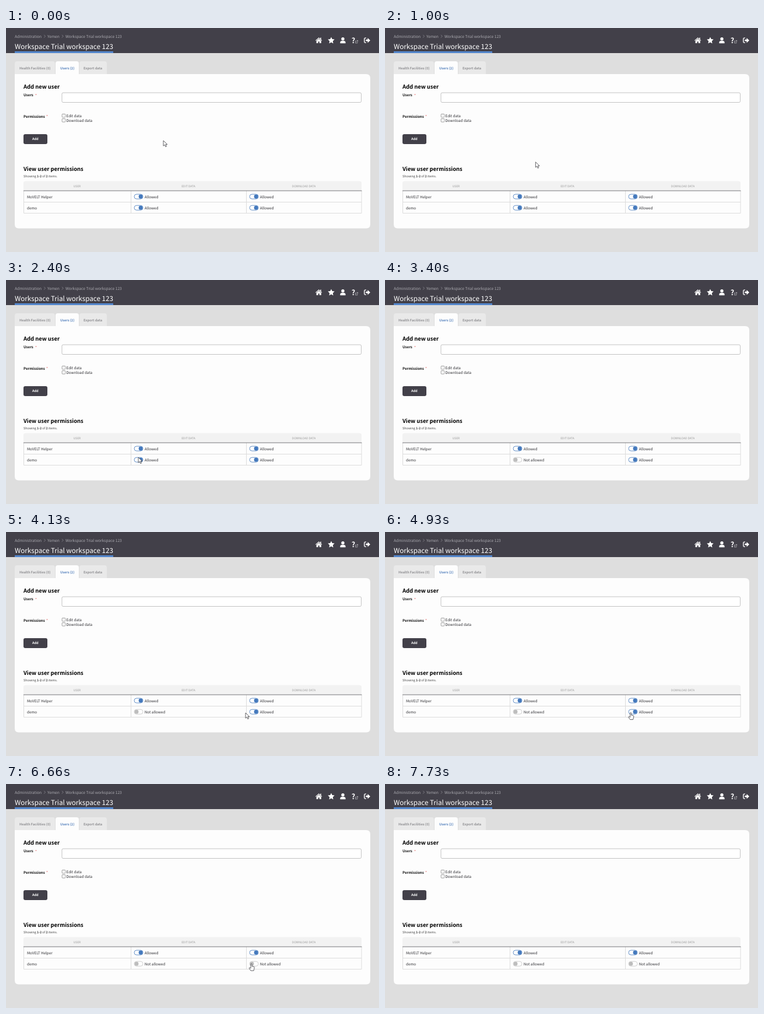
Recreate the animation shown at these times as an HTML page. Size 640 by 384 pixels, loop 8000 ms.

```html
<!DOCTYPE html>
<html lang="en">
<head>
<meta charset="utf-8">
<title>User permissions</title>
<style>
  html, body { margin: 0; width: 100%; height: 100%; overflow: hidden; background: #dedede; }
  svg { display: block; width: 640px; height: 384px; }
  text {
    font-family: "Noto Sans CJK JP", "Noto Sans CJK SC", "Noto Sans", sans-serif;
    font-size: 6.3px; fill: #2c2c30; text-rendering: geometricPrecision;
  }
  .crumb text { font-size: 6.68px; fill: #aaa9af; }
  .title { font-size: 11.65px; font-weight: 500; fill: #fff; }
  .tabs text { font-size: 5.65px; font-weight: 600; fill: #909093; }
  .tabs .active { fill: #5480bd; }
  h2, .heading { font-size: 9.38px; font-weight: 700; fill: #000; }
  .label { font-size: 6.15px; font-weight: 700; fill: #111; }
  .star { fill: #e05a5a; }
  .button { font-size: 5.6px; font-weight: 600; fill: #fff; }
  .summary { font-size: 5.35px; font-weight: 300; fill: #444; }
  .summary tspan { font-weight: 700; }
  .columns text { font-size: 4.95px; fill: #999; text-anchor: middle; }
  .toggle rect { fill: #fff; stroke: #4479bd; stroke-width: .8; }
  .toggle circle { fill: #4479bd; }
  .toggle.off rect { stroke: #c4c4c4; }
  .toggle.off circle { fill: #bdbdbd; }
  .cursor { fill: #fff; stroke: #3a3a3f; stroke-width: .8; stroke-linejoin: round; }
</style>
</head>
<body>
<svg viewBox="0 0 640 384">
  <rect width="640" height="384" fill="#dedede"/>
  <rect width="640" height="43" fill="#424049"/>

  <g class="crumb">
    <text x="15" y="16.6">Administration</text>
    <text x="71" y="16.6">Yemen</text>
    <text x="102" y="16.6">Workspace Trial workspace 123</text>
    <path d="M65.3 11.8l2.2 2.4-2.2 2.4M96 11.8l2.2 2.4-2.2 2.4" fill="none" stroke="#8b8a91" stroke-width=".8"/>
  </g>
  <text class="title" x="15" y="35.7">Workspace Trial workspace 123</text>
  <rect x="15" y="40" width="169" height="2.8" fill="#548bd6"/>

  <g fill="#fff">
    <path d="M531 21.3L536.7 16.3 542.3 21.3 541.6 22 536.7 17.8 531.7 22ZM532.6 22L536.7 18.6 540.8 22V26H537.8V23.2H535.6V26H532.6ZM539.3 16.6h1.4v2.8h-1.4Z"/>
    <path d="M558 15.5L559.7 19.1 563.7 19.6 560.8 22.4 561.5 26.4 558 24.5 554.5 26.4 555.2 22.4 552.3 19.6 556.3 19.1Z"/>
    <circle cx="578" cy="18.7" r="2.7"/>
    <path d="M573.4 26.3V24.8a2.9 2.9 0 0 1 2.9-2.9h3.4a2.9 2.9 0 0 1 2.9 2.9v1.5Z"/>
    <text x="592.7" y="26" style="font-size:12.5px;font-weight:700;fill:#fff">?</text>
    <path d="M601 22.2h-1.6v3.6h3.6v-1.6M601.2 24l2.3-2.4M601.8 21.4h1.9v1.9" fill="none" stroke="#d5d5d8" stroke-width=".6"/>
    <path d="M618 17.1h-1.8q-1.3 0-1.3 1.3v5.4q0 1.3 1.3 1.3h1.8" fill="none" stroke="#fff" stroke-width="1.4"/>
    <path d="M617.4 19.8H620.5V17L625 21.2 620.5 25.4V22.6H617.4Z"/>
  </g>

  <g class="tabs">
    <path d="M15 80V61q0-4 4-4H80q4 0 4 4V80ZM126 80V61q0-4 4-4H169q4 0 4 4V80Z" fill="#e9e9e9"/>
    <path d="M85 80V61q0-4 4-4H121q4 0 4 4V80Z" fill="#fdfdfd"/>
    <text x="23" y="70.6">Health Facilities (0)</text>
    <text class="active" x="93" y="70.6">Users (2)</text>
    <text x="133" y="70.6">Export data</text>
  </g>
  <path d="M15 79H618q7 0 7 7V336.5q0 7-7 7H22q-7 0-7-7Z" fill="#fdfdfd"/>

  <text class="heading" x="30" y="103.8">Add new user</text>
  <text class="label" x="30" y="117.4">Users</text>
  <text class="star" x="50" y="117.6">*</text>
  <rect x="96" y="111" width="513.5" height="16.5" rx="2" fill="#fff" stroke="#b4b4b4" stroke-width=".8"/>
  <text class="label" x="30" y="153.8">Permissions</text>
  <text class="star" x="69" y="154">*</text>
  <g fill="#fff" stroke="#777" stroke-width=".7">
    <rect x="96.2" y="147.5" width="5.6" height="5.6" rx=".8"/>
    <rect x="96.2" y="155.5" width="5.6" height="5.6" rx=".8"/>
  </g>
  <text x="103.5" y="153.3">Edit data</text>
  <text x="103.5" y="161.3">Download data</text>
  <rect x="30" y="182" width="41" height="17" rx="3" fill="#424049"/>
  <text class="button" x="50.3" y="192.4" text-anchor="middle">Add</text>

  <text class="heading" x="30" y="244.5">View user permissions</text>
  <text class="summary" x="30" y="256.3">Showing <tspan>1-2</tspan> of <tspan>2</tspan> items.</text>
  <path d="M30 279V266q0-3.500 3.500-3.500H606.500q3.500 0 3.500 3.500V279Z" fill="#f2f2f2"/>
  <path d="M30.500 279V317.500H610V279M30.500 298.500H610M214.500 279V317.500M412.500 279V317.500" fill="none" stroke="#dcdcdc"/>
  <path d="M30 279H610.500" stroke="#77777b"/>
  <g class="columns">
    <text x="122" y="272.5">USER</text>
    <text x="313" y="272.5">EDIT DATA</text>
    <text x="511" y="272.5">DOWNLOAD DATA</text>
  </g>
  <text x="36" y="291.500">MoVELT Helper</text>
  <text x="36" y="310.700">demo</text>
  <g id="toggles"></g>

  <g id="cursor" class="cursor">
    <path id="arrow" d="M0 0V9.200L2.200 7.200 3.800 10.600 5.400 9.900 3.900 6.600H6.800Z"/>
    <path id="hand" d="M-1 1a1 1 0 0 1 2 0V4.500L4.200 5.100Q5.300 5.400 5.200 6.600L4.600 9.500 4 12H-1L-3.600 8.400Q-4.400 7.100 -3.200 6.800L-1 8Z"/>
  </g>
</svg>
<script>
const LOOP = 8000, TICK = 200 / 3;
const $ = id => document.getElementById(id);

// x, y and the time each switch is turned off
const toggles = [
  [220, 289, Infinity], [418, 289, Infinity],
  [220, 308.2, 2800], [418, 308.2, 5330],
];
// time, x, y of the pointer
const path = [
  [0, 270, 193], [1800, 250, 256], [2400, 227, 304], [2600, 229, 309],
  [2900, 229, 312], [3460, 230, 312], [4130, 411, 310], [4260, 411, 310],
  [4600, 423, 313], [5130, 421, 308], [LOOP, 421, 308],
];
const within = (t, a, b) => t >= a && t < b;
const show = (el, on) => el.setAttribute("visibility", on ? "inherit" : "hidden");

$("toggles").innerHTML = toggles.map(([x, y]) => `<g class="toggle">
  <rect x="${x}" y="${y - 4}" width="15" height="8" rx="4"/>
  <circle cy="${y}" r="3.4"/><text x="${x + 17.8}" y="${y + 2.5}"></text></g>`).join("");
const switches = [...$("toggles").children];

function pointerAt(t) {
  const i = path.findIndex(p => p[0] > t);
  const [t0, x0, y0] = path[i - 1], [t1, x1, y1] = path[i];
  const u = (t - t0) / (t1 - t0), e = u * u * (3 - 2 * u);
  return [x0 + (x1 - x0) * e, y0 + (y1 - y0) * e];
}

function draw(t) {
  switches.forEach((el, i) => {
    const [x, , offAt] = toggles[i], off = t >= offAt;
    el.classList.toggle("off", off);
    el.querySelector("circle").setAttribute("cx", x + (off ? 4 : 11));
    el.querySelector("text").textContent = off ? "Not allowed" : "Allowed";
  });
  const overSwitch = within(t, 2460, 3600) || t >= 4390;
  show($("cursor"), !within(t, 3200, 3460) && t < 6930);
  show($("arrow"), !overSwitch);
  show($("hand"), overSwitch);
  $("cursor").setAttribute("transform", `translate(${pointerAt(t)})`);
}

function frame() {
  const t = performance.now() % LOOP;
  draw(Math.min(LOOP - 1, Math.floor((t + 7) / TICK) * TICK));
  requestAnimationFrame(frame);
}
frame();
</script>
</body>
</html>
```
